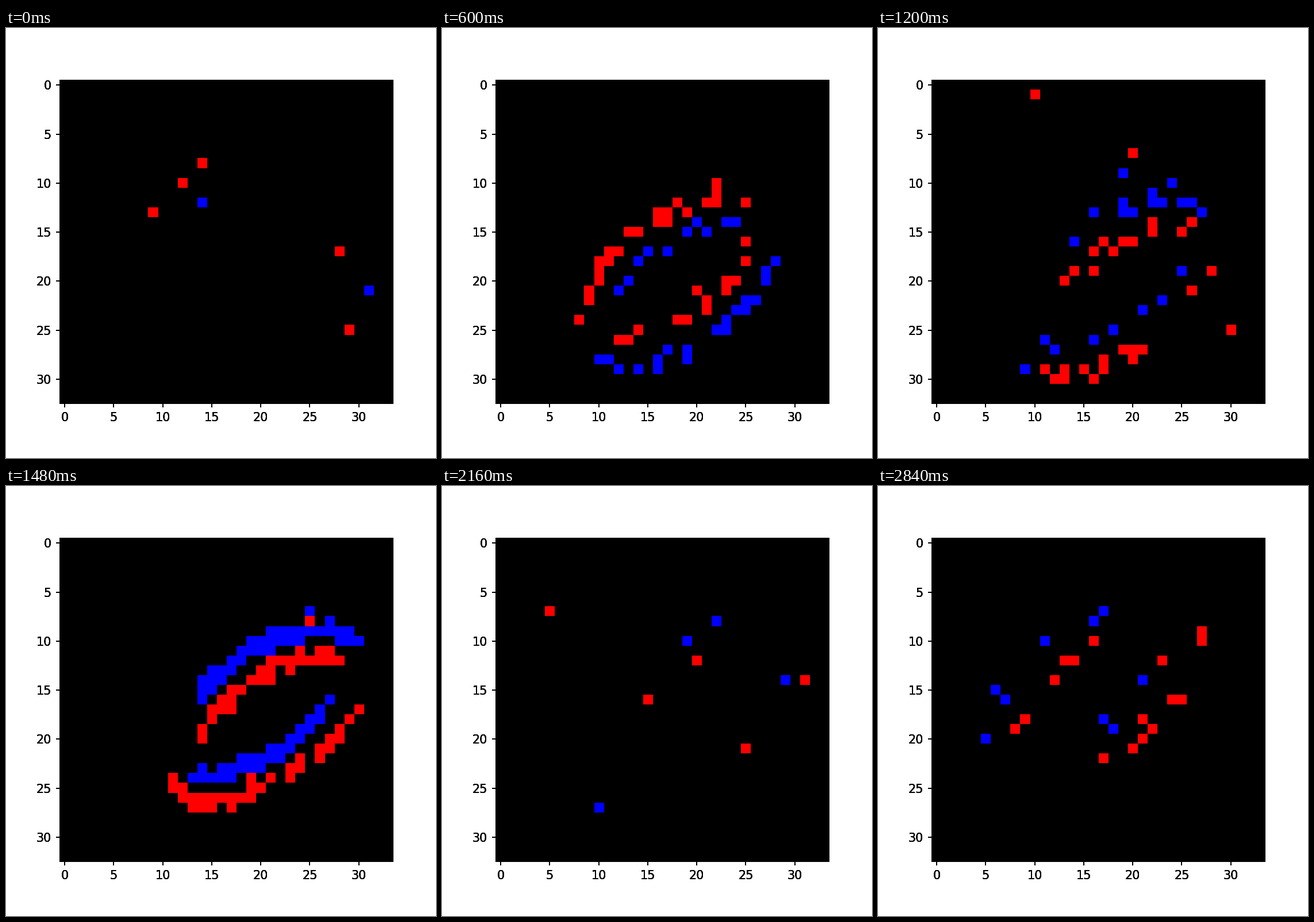
Write a matplotlib script that moves like this. It is 748 px wide and 748 px high and loops after 2.88 s.

```python
import math

import numpy as np
import matplotlib.pyplot as plt
from matplotlib.animation import FuncAnimation

FRAMES, INTERVAL = 72, 40
ROWS, COLS = 33, 34
RED, BLUE = (255, 0, 0), (0, 0, 255)

# The digit jumps around a triangle in three saccades
STOPS = np.array([(15.8, 14.8), (18.5, 20.6), (21.8, 15.6), (15.8, 14.8)])
STEPS = np.diff(STOPS, axis=0)
PEAKS = np.array([10.5, 36.0, 63.2])
HEADINGS = np.radians([68, -88, -170])
SPREAD = 4.0

# Slanted ellipse of the zero
LONG, SHORT, TILT = 10.4, 5.0, math.radians(-37)
STROKE = 1.25

GRID = np.stack(np.meshgrid(np.arange(COLS), np.arange(ROWS)), axis=-1)


def ellipse():
    t = np.linspace(0, 2 * np.pi, 150, endpoint=False)
    u, v = LONG * np.cos(t), SHORT * np.sin(t)
    c, s = math.cos(TILT), math.sin(TILT)
    return np.stack([u * c - v * s, u * s + v * c], axis=-1)


RING = ellipse()
SPUR = np.linspace((4.8, -7.5), (4.8, -9.3), 10)


def glow(line, centre, width):
    gap = GRID[:, :, None, :] - (line + centre)
    return np.exp(-(gap ** 2).sum(-1).min(-1) / (2 * width ** 2))


def light(centre):
    return np.maximum(glow(RING, centre, STROKE),
                      0.6 * glow(SPUR, centre, 0.9))


def position(n):
    done = [0.5 + 0.5 * math.erf((n - p) / (SPREAD * math.sqrt(2)))
            for p in PEAKS]
    return STOPS[0] + np.array(done) @ STEPS


def events(n):
    """Sensor image: blue where it gets brighter, red where darker."""
    rng = np.random.default_rng(500 + n)
    img = np.zeros((ROWS, COLS, 3), np.uint8)

    k = np.argmin(abs(PEAKS - n))
    activity = math.exp(-((n - PEAKS[k]) / SPREAD) ** 2 / 2)
    half = 0.5 * np.array([math.cos(HEADINGS[k]), math.sin(HEADINGS[k])])
    centre = position(n)
    change = light(centre + half) - light(centre - half)
    size = abs(change)
    chance = np.clip(2.2 * size / np.percentile(size, 93) - 1.2, 0, 0.95)
    fired = rng.random(size.shape) < activity * chance
    img[fired & (change > 0)] = BLUE
    img[fired & (change < 0)] = RED

    for _ in range(rng.poisson(2.7)):
        x, y = rng.integers(COLS), rng.integers(ROWS)
        img[y, x] = RED if rng.random() < 0.85 else BLUE
    return img


fig = plt.figure(figsize=(5, 5), dpi=149.6, facecolor="white")
fig.subplots_adjust(left=0.125, right=0.9, bottom=0.125, top=0.88)
ax = fig.add_subplot()
picture = ax.imshow(events(0), interpolation="nearest")

# Stacked copies of the axes harden the soft edges of lines and labels
layers = [ax] + [fig.add_subplot(facecolor="none") for _ in range(3)]
for layer in layers:
    layer.set(xlim=(-0.5, COLS - 0.5), ylim=(ROWS - 0.5, -0.5), aspect="equal",
              xticks=range(0, 31, 5), yticks=range(0, 31, 5))


def draw(n):
    picture.set_data(events(n))
    return [picture]


anim = FuncAnimation(fig, draw, frames=FRAMES, interval=INTERVAL,
                     repeat=True, repeat_delay=0)
plt.show()
```
